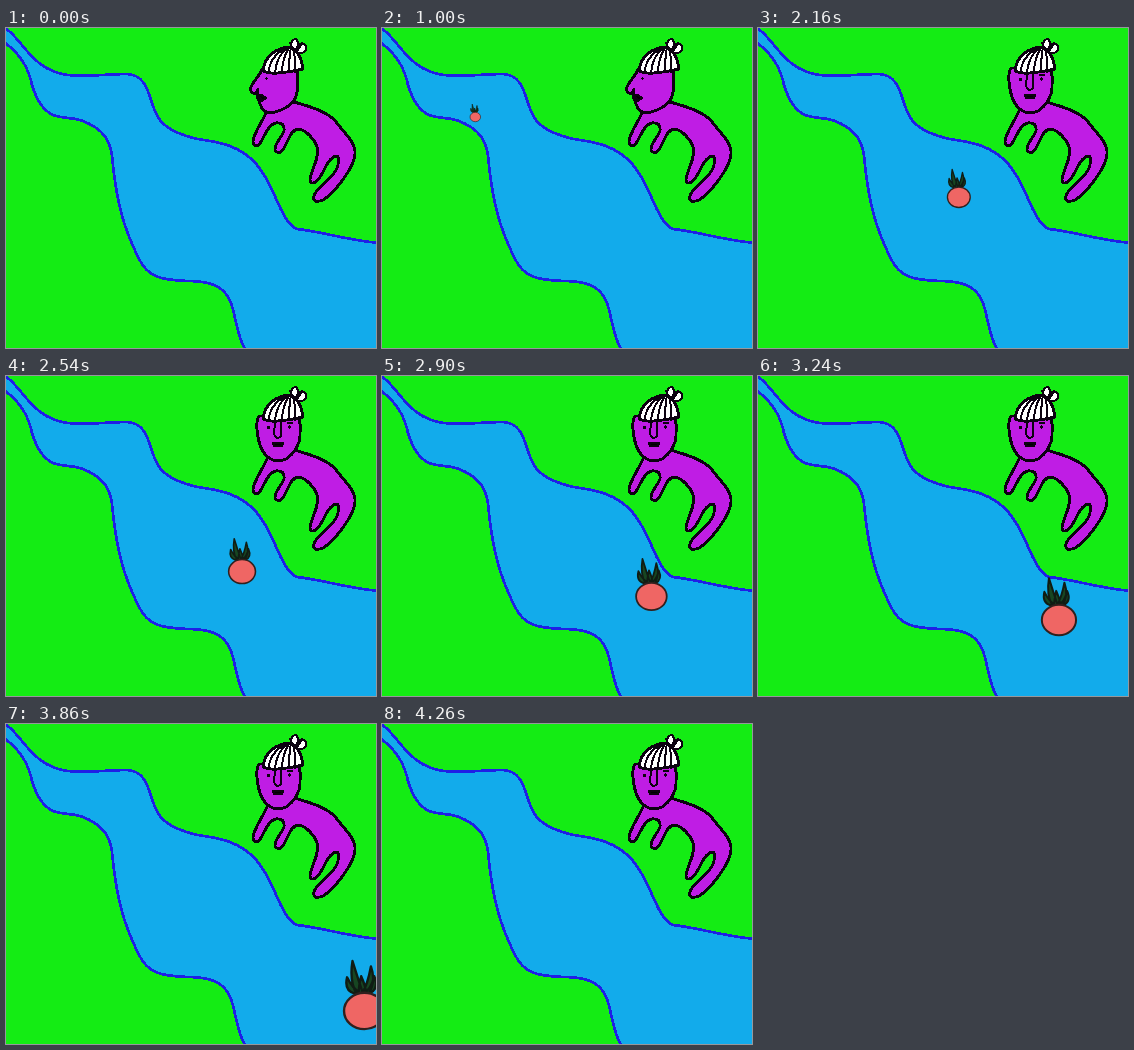
An HTML page for the animation above (4300 ms loop, 370 by 320 pixels).

```html
<!DOCTYPE html>
<html lang="en">
<head>
<meta charset="utf-8">
<title>River</title>
<style>
  html, body { margin: 0; width: 100%; height: 100%; overflow: hidden; background: #14ec14; }
  svg { display: block; width: 370px; height: 320px; }
  #scene { shape-rendering: crispEdges; }
  path { stroke-linejoin: round; stroke-linecap: round; }
  .bank { stroke: #1f1fe6; stroke-width: 2.7; }
  .ink { stroke: #0c0210; stroke-width: 2.9; }
  .thin { stroke-width: 2; }
  .skin { fill: #bf1de4; }
  .line { fill: none; }
  .wool { fill: #fff; }
  .eye { fill: #0c0210; }
  .leaf { fill: #174622; stroke: #101c14; stroke-width: 2.2; }
  .root { fill: #ef6664; stroke: #30201e; stroke-width: 2.2; }
</style>
</head>
<body>
<svg viewBox="0 0 370 320">
  <g id="scene">
    <rect width="370" height="320" fill="#12abeb"/>
    <g class="bank" fill="#14ec14">
      <path d="M-1 0C16 10 26 43 62 47C80 49 105 46 120 46C142 46 143 70 149 83C154 97 166 104 187 110C200 113 211 113 224 118C247 127 257 142 268 166C275 182 281 197 291 201C318 204 340 212 373 215V-4H-4Z"/>
      <path d="M-4 13L-1 15C16 27 23 42 26 57C30 70 36 82 47 87C57 91 67 89 77 93C97 101 104 112 106 128C110 170 116 197 133 231C142 249 155 252 181 253C194 253 206 254 215 261C232 274 226 300 240 323H-4Z"/>
    </g>

    <path class="ink skin" d="M263 78C258 92 248 104 247 113Q247 119 253 117C258 110 262 96 270 95Q279 94 278 103C275 111 269 114 269 122Q272 127 276 123C283 114 283 102 293 101C300 102 309 112 311 119C314 130 305 142 304 151Q304 157 310 154C318 147 320 131 330 128Q335 128 331 140C327 151 309 160 308 168Q306 176 317 172C327 166 348 141 349 126C350 114 338 105 331 95C322 83 302 78 288 74Z"/>

    <g id="profile">
      <path class="ink skin" d="M256 41C254 48 247 53 244.500 60Q244 65 250 66L252 61L251 68L254 76C256 82 260 85 265 85C272 84 281 80 286 75C292 69 293 56 291 40Z"/>
      <path class="ink thin" d="M252 67L256 67L260 70L256 73Z"/>
      <circle class="eye" cx="260.500" cy="50.500" r="1.300"/>
    </g>
    <g id="front">
      <path class="ink skin" d="M253 40C249 46 251 55 252 61C254 72 259 81 267 84Q273 86 280 83C288 78 294 68 294 59Q295 50 293 40Z"/>
      <path class="ink thin line" d="M269 48L268 57Q269 62 272 62Q276 61 275 56V46M282 47H286"/>
      <path class="ink thin" d="M267 67H277L276 70H268Z"/>
      <circle class="eye" cx="262.500" cy="51.500" r="1.600"/>
      <circle class="eye" cx="283.500" cy="51" r="1.600"/>
    </g>

    <g class="ink thin wool">
      <path d="M288 23C283 19 285 11 290 11C293 14 292 19 290 23C291 17 296 13 300 18C302 23 297 26 291 25Z"/>
      <path class="line" d="M284 15L287 22M296 15L292 22"/>
      <path class="ink" d="M257 43C258 33 264 25 274 21Q282 18 288 21C294 26 296 33 297 41Q285 44 272 45Q263 46 257 43Z"/>
      <path id="stripes" class="line"/>
    </g>
  </g>

  <g id="beet">
    <path id="leaves" class="leaf"/>
    <ellipse class="root" rx="18.800" ry="16.800"/>
  </g>
</svg>
<script>
const LOOP = 4300, STEP = 20, START = 60, TURN = 1920, EXIT = 4260, FULL_SIZE = 3560;
const $ = id => document.getElementById(id);
const show = (id, on) => $(id).setAttribute('display', on ? 'inline' : 'none');

// Hat stripes fan out from the crown to the brim
let stripes = '';
for (let i = 1; i < 6; i++) {
  const top = 275 + 2.4 * i, brim = 256 + 6.6 * i;
  stripes += `M${top} 21Q${brim + 1} 30 ${brim} 44`;
}
$('stripes').setAttribute('d', stripes);

// Each leaf is a blade from the top of the root to its tip
const blade = ([x, y]) => {
  const foot = x * 0.3 - 1;
  return `M${foot - 3} -16Q${x - 3} ${y * 0.6} ${x} ${y}Q${x + 5} ${y * 0.65} ${foot + 3} -16Z`;
};
$('leaves').setAttribute('d', [[-16, -31], [9, -32], [-11, -46], [6, -41], [-3, -32]].map(blade).join(''));

function draw(time) {
  const t = Math.floor(time % LOOP / STEP) * STEP;
  const x = 0.6 + 0.0927 * t, y = 19.8 + 0.0692 * t;
  $('beet').setAttribute('transform', `translate(${x} ${y}) scale(${t / FULL_SIZE})`);
  show('beet', t >= START && t < EXIT);
  show('profile', t < TURN);
  show('front', t >= TURN);
}

const origin = performance.now();
function tick() {
  draw(performance.now() - origin);
  requestAnimationFrame(tick);
}
tick();
</script>
</body>
</html>
```
